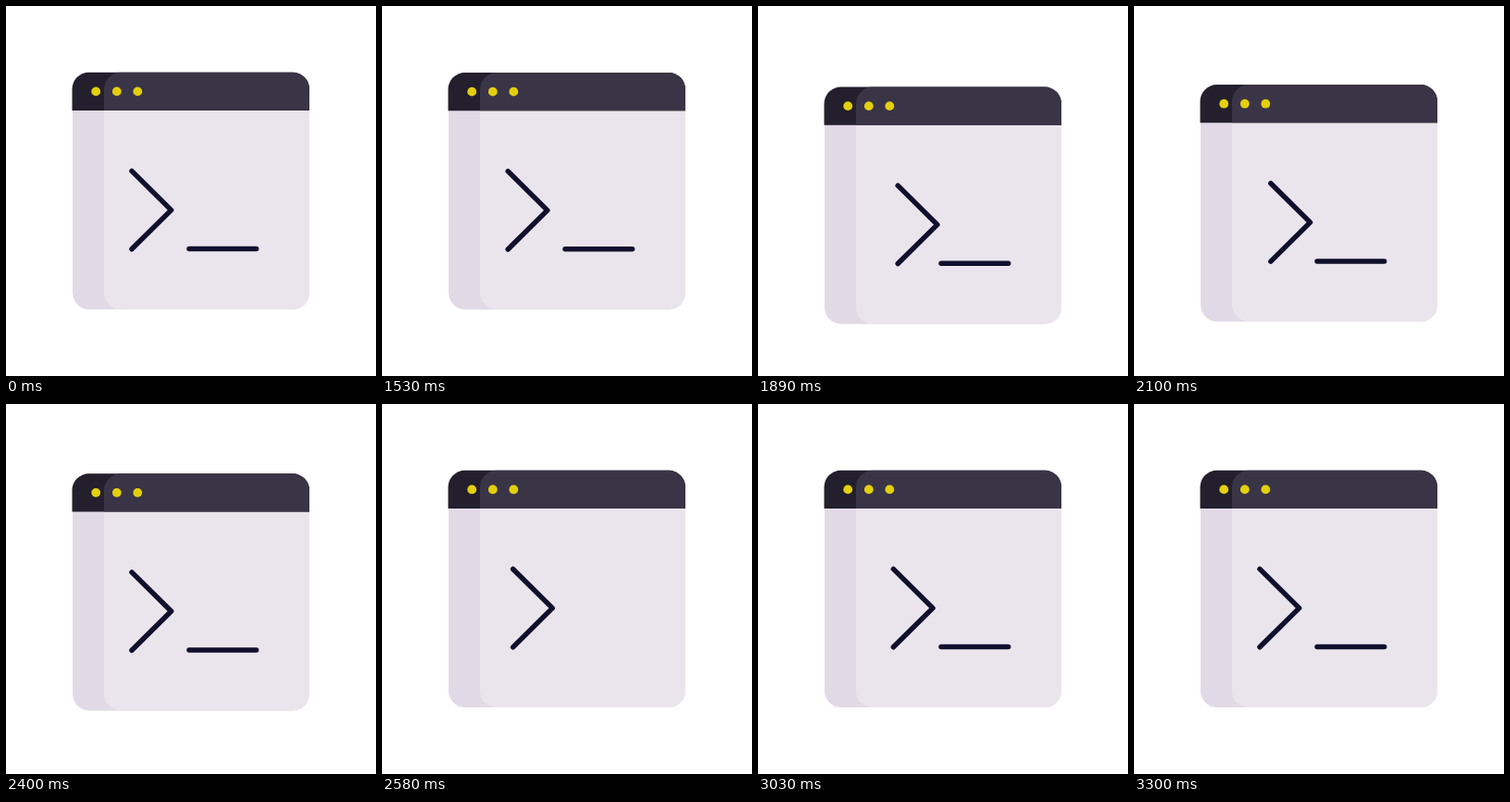
An HTML page for the animation above (3.36 s loop, 400 by 400 pixels).

```html
<!DOCTYPE html>
<html lang="en">
<head>
<meta charset="utf-8">
<title>Terminal window</title>
<style>
  html, body { margin: 0; width: 100%; height: 100%; overflow: hidden; background: #fff; }
  svg { display: block; width: 100vw; height: 100vh; }
</style>
</head>
<body>
<svg viewBox="0 0 400 400">
  <defs>
    <clipPath id="head"><rect x="71" y="71" width="258" height="42"/></clipPath>
  </defs>
  <g id="win">
    <rect x="72" y="72" width="256" height="256" rx="18" fill="#e1dae6"/>
    <rect x="106" y="72" width="222" height="256" rx="18" fill="#eae5ec"/>
    <g clip-path="url(#head)">
      <rect x="71.5" y="71.8" width="256.5" height="80" rx="18" fill="#231f2d"/>
      <rect x="106" y="71.8" width="222" height="80" rx="18" fill="#3a3447"/>
    </g>
    <g fill="#e3cf0c">
      <circle cx="97.2" cy="92.4" r="4.9"/>
      <circle cx="119.8" cy="92.4" r="4.9"/>
      <circle cx="142.3" cy="92.4" r="4.9"/>
    </g>
    <g fill="none" stroke="#10102e" stroke-width="5.5" stroke-linecap="round" stroke-linejoin="round">
      <path id="prompt" d="M136 178.4 178.6 220.6 136 262.8"/>
      <path id="cursor" d="M198 262.6H270.6"/>
    </g>
  </g>
</svg>
<script>
  const LOOP = 3360, STEP = 30, START = 1500, END = 3300, BLINK = 300;
  const [win, prompt, cursor] = ['win', 'prompt', 'cursor'].map(id => document.getElementById(id));

  // [time, value] keys
  const drop = [[START, 0], [1922, 16], [2605, 0]];
  const push = [[START, 0], [1950, 16], [2400, 0], [2850, 16], [END, 0]];

  const ease = u => u * u * (3 - 2 * u);

  function valueAt(keys, t) {
    const i = keys.findIndex(k => k[0] > t);
    if (i < 1) return 0;
    const [t0, a] = keys[i - 1], [t1, b] = keys[i];
    return a + (b - a) * ease((t - t0) / (t1 - t0));
  }

  function draw(now) {
    const t = Math.floor((now % LOOP) / STEP) * STEP;
    win.setAttribute('transform', `translate(0 ${valueAt(drop, t).toFixed(2)})`);
    prompt.setAttribute('transform', `translate(${valueAt(push, t).toFixed(2)} 0)`);
    const hidden = t > START && t < END && (t - START) % BLINK >= BLINK / 2;
    cursor.setAttribute('visibility', hidden ? 'hidden' : 'visible');
  }

  const begin = performance.now();
  function tick() {
    draw(performance.now() - begin);
    requestAnimationFrame(tick);
  }
  tick();
</script>
</body>
</html>
```
